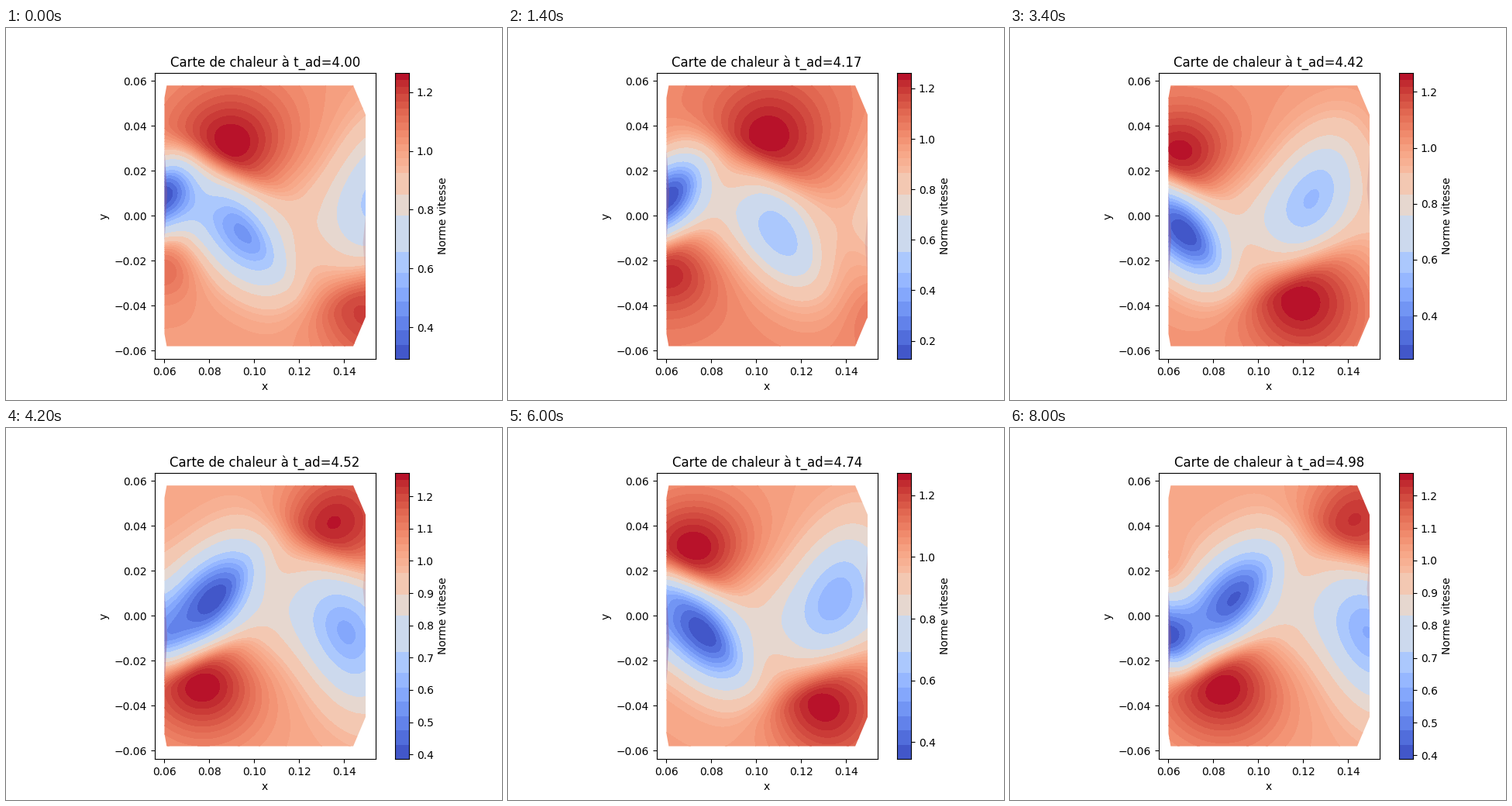
Write a matplotlib script that moves like this. It is 640 by 480 pixels and loops after 8200 ms.

```python
import numpy as np
import matplotlib
import matplotlib.pyplot as plt
from matplotlib.animation import FuncAnimation
from matplotlib.patches import Polygon, Rectangle

W, H, DPI = 640, 480, 100
FRAMES, STEP_MS = 41, 200
T0, DT = 4.0, 0.02454
SHED = 0.16125  # shedding cycles per frame
X_LIM, Y_LIM = (0.05553, 0.15391), (-0.063724, 0.063724)

# Colour bands as fractions of the value range
BANDS = np.array([*range(0, 13, 2), 15, 20, 23, *range(26, 41)]) / 40
COLORS = matplotlib.colormaps["coolwarm"]((BANDS[:-1] + BANDS[1:]) / 2)

X, Y = np.meshgrid(np.linspace(0.0595, 0.1505, 190), np.linspace(-0.0585, 0.0585, 240))
DEFICIT = 0.10 + 0.18 * np.exp(-(X - 0.06) / 0.035)
BASE = 1.02 - DEFICIT * np.exp(-0.5 * (Y / (0.014 + 0.06 * (X - 0.06))) ** 2)


def logistic(t):
    return 1 / (1 + np.exp(-t))


def drift(x0, speed, age):
    """Position of an eddy that forms near x=0.06, then is carried downstream."""
    w = 0.008
    return 0.0595 + w * np.log1p(np.exp((x0 - 0.0595 + speed * age) / w))


def growth(age):
    return 1 - np.exp(-(max(age, -0.65) + 0.7) / 0.25)


def bump(x0, y0, tilt, left, right, low, up):
    """Tilted Gaussian with its own width on each of its four sides."""
    def blob(side):
        c, s = np.cos(np.radians(tilt)), np.sin(np.radians(tilt))
        dx, dy = X - x0, side * Y - y0
        u, v = c * dx + s * dy, c * dy - s * dx
        su, sv = np.where(u < 0, left, right), np.where(v < 0, low, up)
        return np.exp(-0.5 * ((u / su) ** 2 + (v / sv) ** 2))
    return blob


def fast_eddy(age, side):
    g, late = growth(age), max(age, 0)
    amp = 0.30 * logistic((age + 0.53) / 0.04) * logistic((0.6 - age) / 0.08)
    blob = bump(drift(0.0885, 0.118, age), 0.028 + 0.021 * age, -29,
                0.021 * g - 0.01 * late, 0.020 * g, 0.0065 + 0.006 * late, 0.022 * g)
    return amp * blob(side)


def slow_eddy(age, side):
    g, late = growth(age), max(age, 0)
    amp = logistic((age + 0.545) / 0.05) * (0.20 + 0.38 * np.exp(-(age + 0.4) / 0.6))
    length = 0.021 * g + 0.008 * late
    blob = bump(drift(0.0975, 0.115, age), -0.0115, -54 - 50 * late,
                length, length, 0.014 * g, 0.0085 + 0.015 * late)
    return amp * blob(side)


def value_range(q):
    lo = np.interp(q, [-0.146, -0.114, -0.05, 0.1, 0.13],
                   [0.3616, 0.3856, 0.388, 0.098, 0.129], period=0.5)
    hi = 1.268 - 0.006 * np.cos(4 * np.pi * (q - 0.11))
    return lo, hi


def flow(i):
    """Speed field, its range and the side of the leading eddy."""
    half, q = divmod(i * SHED + 0.15, 0.5)
    q -= 0.15
    side = -1 if half % 2 else 1
    speed = BASE.copy()
    for n in range(-2, 2):
        s = side * (-1) ** n
        speed += fast_eddy(q + n / 2, s) - slow_eddy(q + n / 2, s)
    lo, hi = value_range(q)
    speed = np.interp(speed, [speed.min(), 0.8, 1.0, speed.max()], [lo, 0.8, 1.0, hi])
    return np.clip(speed, lo + 1e-4, hi - 1e-4), lo, hi, side


fig = plt.figure(figsize=(W / DPI, H / DPI), dpi=DPI, facecolor="white")
ax = fig.add_axes([191.5 / W, 0.11, 285.3 / W, 0.77])
ax.set(xlim=X_LIM, ylim=Y_LIM, xlabel="x", ylabel="y")
title = ax.set_title("")

upper = [(0.06, 0.0525), (0.061, 0.058), (0.144, 0.058), (0.1495, 0.045)]
domain = Polygon(upper + [(x, -y) for x, y in reversed(upper)],
                 facecolor="none", edgecolor="none")
left_sliver = Polygon([(0, 0)] * 3, color="#8d5f97", alpha=0.5, lw=0, zorder=3)
right_sliver = Polygon([(0, 0)] * 3, color="#c58f95", alpha=0.35, lw=0, zorder=3)
for patch in (domain, left_sliver, right_sliver):
    ax.add_patch(patch)

cax = fig.add_axes([501.6 / W, 0.11, 18.48 / W, 0.77])
cax.set(xlim=(0, 1), xticks=[])
cax.yaxis.tick_right()
cax.yaxis.set_label_position("right")
cax.set_ylabel("Norme vitesse")
for b0, b1, color in zip(BANDS[:-1], BANDS[1:], COLORS):
    cax.add_patch(Rectangle((0, b0), 1, b1 - b0, transform=cax.transAxes,
                            facecolor=color, lw=0, antialiased=False))

heat = None


def update(i):
    global heat
    if heat is not None:
        heat.remove()
    speed, lo, hi, side = flow(i)
    heat = ax.contourf(X, Y, speed, levels=lo + BANDS * (hi - lo), colors=COLORS)
    heat.set_clip_path(domain)
    ax.set(xlim=X_LIM, ylim=Y_LIM)
    left_sliver.set_xy([(.06, .03 * side), (.0612, .01 * side), (.06, -.012 * side)])
    right_sliver.set_xy([(.1495, 0), (.1483, -.012 * side), (.1495, -.028 * side)])
    cax.set_ylim(lo, hi)
    title.set_text(f"Carte de chaleur à t_ad={T0 + i * DT:.2f}")
    return []


anim = FuncAnimation(fig, update, frames=FRAMES, init_func=lambda: [],
                     interval=STEP_MS, repeat=True, repeat_delay=0, blit=False)
plt.show()
```
